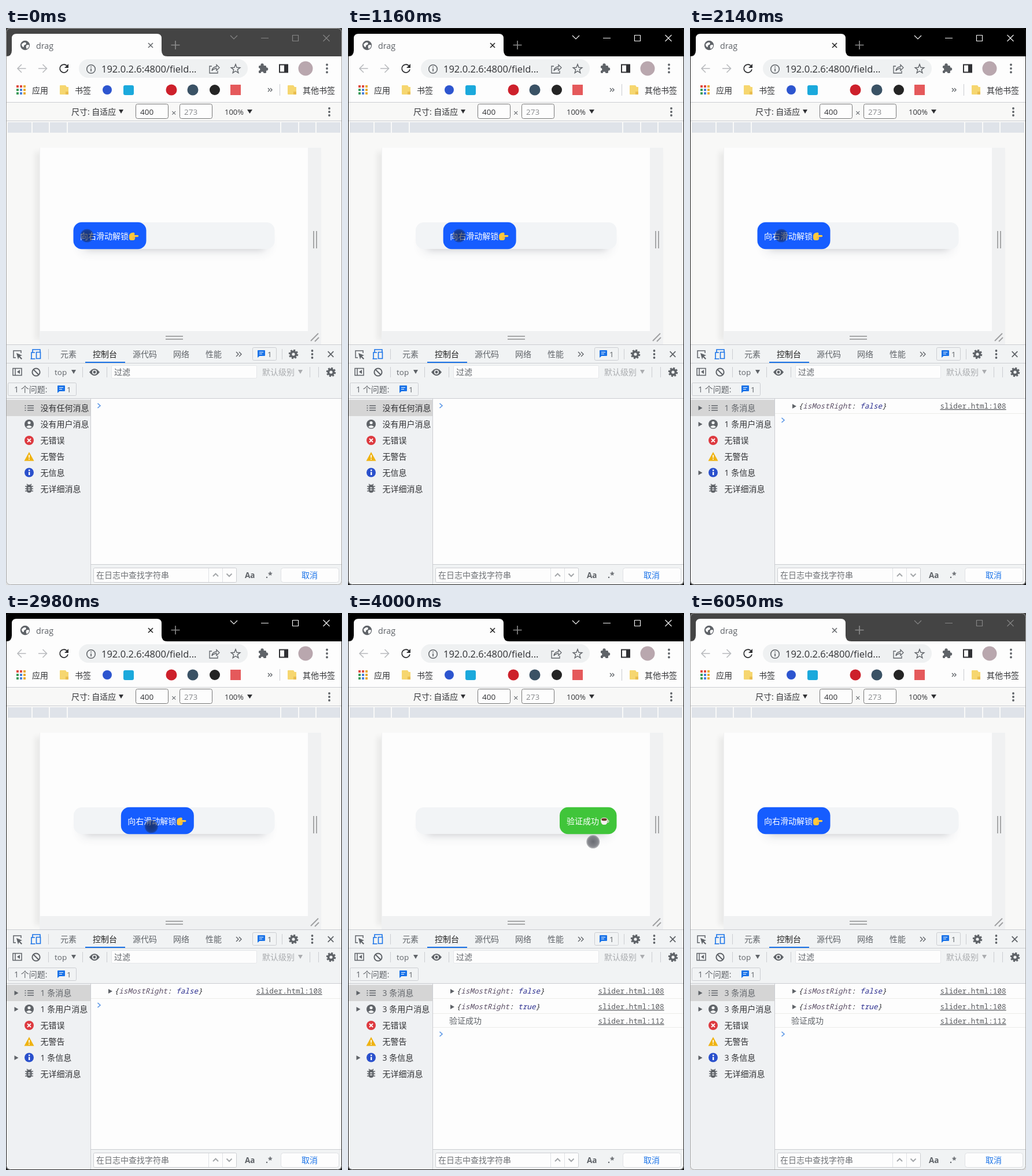
Write an HTML page that moves like this. It is 581 by 963 pixels and loops after 6130 ms.

```html
<!DOCTYPE html>
<html lang="zh-CN">
<head>
<meta charset="utf-8">
<title>Slide to unlock</title>
<style>
html, body { margin: 0; width: 100%; height: 100%; overflow: hidden; background: #fdfdfd; }
svg { display: block; width: 581px; height: 963px; }
text { font-family: "Open Sans", "Noto Sans CJK SC", "Noto Sans CJK JP", "Noto Sans CJK", sans-serif; white-space: pre; }
.mono { font-family: "Noto Sans Mono", "DejaVu Sans Mono", monospace; }
</style>
</head>
<body>
<svg id="stage" viewBox="0 0 581 963" xmlns="http://www.w3.org/2000/svg"></svg>
<script>
const LOOP = 6130;
const INK = '#5f6368', DARK = '#303134', BLUE = '#1a73e8', LINE = '#cbcdd1', PANEL = '#f1f3f4', WHITE = '#fdfdfd';

// Drawing helpers
const rect = (x, y, w, h, fill, extra = '') => `<rect x="${x}" y="${y}" width="${w}" height="${h}" fill="${fill}" ${extra}/>`;
const box = (x, y, w, h, stroke, r = 2, fill = WHITE) => rect(x + .5, y + .5, w - 1, h - 1, fill, `stroke="${stroke}" rx="${r}"`);
const disc = (x, y, r, fill, extra = '') => `<circle cx="${x}" cy="${y}" r="${r}" fill="${fill}" ${extra}/>`;
const ring = (x, y, r, stroke, w = 1.6, extra = '') => disc(x, y, r, 'none', `stroke="${stroke}" stroke-width="${w}" ${extra}`);
const line = (d, stroke = INK, w = 1.6, extra = '') => `<path d="${d}" fill="none" stroke="${stroke}" stroke-width="${w}" ${extra}/>`;
const shape = (d, fill = INK, extra = '') => `<path d="${d}" fill="${fill}" ${extra}/>`;
const text = (x, y, s, fill = DARK, size = 14, extra = '') => `<text x="${x}" y="${y}" font-size="${size}" fill="${fill}" ${extra}>${s}</text>`;
const group = (id, body) => `<g id="${id}">${body}</g>`;
const vline = (x, y1, y2, c = LINE) => rect(x, y1, 1, y2 - y1, c);
const hline = (y, x1 = 0, x2 = 581, c = LINE) => rect(x1, y, x2 - x1, 1, c);
const cross = (x, y, r, c, w = 1.6) => line(`M${x - r} ${y - r}l${2 * r} ${2 * r}m0 ${-2 * r}l${-2 * r} ${2 * r}`, c, w);
const down = (x, y, c = DARK, w = 8, h = 7) => shape(`M${x} ${y}h${w}l${-w / 2} ${h}z`, c);
const play = (x, y) => shape(`M${x} ${y - 4}l7 4l-7 4z`);
const dots = (x, y, gap) => [-gap, 0, gap].map(d => disc(x, y + d, 1.9, INK)).join('');
const gear = (x, y) => ring(x, y, 4.5, INK, 3.8) + ring(x, y, 7, INK, 2.6, 'stroke-dasharray="3 2.5"');
const chat = (x, y) => shape(`M${x + 1} ${y}h11q1 0 1 1v8q0 1 -1 1h-8.500l-3.500 3v-12q0 -1 1 -1z`, BLUE) +
  line(`M${x + 3} ${y + 3.5}h7m-7 3h5`, '#fff', 1.2);
const more = (x, y, r = 4) => line(`M${x} ${y - r}l${r} ${r}l${-r} ${r}m${r + 1} ${-2 * r}l${r} ${r}l${-r} ${r}`, INK, 1.4);
const folder = (x, y) => shape(`M${x} ${y + 1}q0 -1 1 -1h9l2 3h3v12q0 1 -1 1h-13q-1 0 -1 -1z`, '#f6d66f') +
  shape(`M${x + 10} ${y + 11}h5v5h-5z`, '#e9bd50');

function tabStrip() {
  return rect(0, 0, 581, 60, '#444', 'id="title"') +
    shape('M0 49Q10 49 10 39V18Q10 10 18 10H261Q269 10 269 18V39Q269 49 279 49V50H0z', WHITE) +
    disc(33, 30, 8.2, INK) + shape('M27 28q4 -4 7 -3q2 3 -1 4q-3 1 -2 4q-4 0 -4 -5zM35 30q4 -2 5 0q0 4 -4 6q-2 -2 -1 -6z', WHITE) +
    text(52, 35.5, 'drag', INK, 14.3) +
    group('tabClose', cross(250, 30, 4, 'currentColor')) +
    line('M293 22v15m-7.500 -7.500h15', '#8d8d8d') +
    group('controls', line('M388 13l6 6l6 -6M441 17.500h13', 'currentColor', 1.2) +
      line('M495.500 12.500h10v10h-10z', 'currentColor', 1.2, 'stroke-linejoin="round"') + cross(554, 17.5, 5.5, 'currentColor', 1.2));
}

function toolbar() {
  const puzzle = rect(437, 65, 13, 13, INK, 'rx="1.500"') + disc(443, 64, 2.7, INK) + disc(450.5, 71, 2.7, INK) +
    disc(437, 71.5, 2.4, WHITE) + disc(443, 78, 2.4, WHITE);
  const star = Array.from({ length: 10 }, (_, i) => {
    const r = i % 2 ? 3.5 : 8.2, a = i * Math.PI / 5;
    return (397 + r * Math.sin(a)).toFixed(1) + ' ' + (71 - r * Math.cos(a)).toFixed(1);
  }).join('L');
  return rect(0, 49, 581, 79, WHITE) +
    line('M34.500 70H20m7 -7l-7 7l7 7M56 70h14.500m-7 -7l7 7l-7 7', '#b9bbbe') +
    line('M105.500 65.500a7 7 0 1 0 1.500 6', DARK, 1.8) + shape('M108 62v7h-7z', DARK) +
    rect(126, 54, 292, 32, '#eff1f2', 'rx="16"') +
    ring(147, 71, 7.3, INK, 1.5) + rect(146.2, 70, 1.7, 5, INK) + rect(146.2, 66.5, 1.7, 1.8, INK) +
    text(165, 77, '192.0.2.6:4800/field...', DARK, 16.5) +
    line('M356 66h-4v12h14v-4M356 74q1 -7 8 -7v-3.500l5 5l-5 5v-3.500q-5 0 -8 4z', INK, 1.3) +
    line('M' + star + 'z', INK, 1.4) + puzzle +
    line('M473 63.500h14v13h-14z', DARK, 2) + rect(481, 63, 6, 14, DARK) +
    disc(518, 70, 12.5, '#b9a7ae') + dots(555, 70, 6.5);
}

function bookmarks() {
  const colors = ['#df4b3f', '#df4b3f', '#e8aa32', '#3b9b5a', '#4a82dd', '#e8aa32', '#3b9b5a', '#4a82dd', '#e8aa32'];
  const apps = colors.map((c, i) => rect(18 + i % 3 * 6, 99 + Math.floor(i / 3) * 6, 4, 4, c)).join('');
  return apps + text(45, 113, '应用') + folder(93, 99) + text(119, 113, '书签') +
    disc(175, 107, 8, '#2d55cf') + rect(203, 99, 18, 17, '#1ba9dc', 'rx="3"') +
    disc(286, 107, 9.5, '#cd202b') + disc(323, 107, 9.5, '#3a5265') + disc(361, 107, 9, '#242424') +
    rect(388, 98, 18, 18, '#e5595b') +
    more(453, 107, 3) + vline(473, 97, 117) + folder(487, 99) + text(513, 113, '其他书签') + hline(128);
}

function deviceArea() {
  const ticks = [45, 75, 106, 475, 506, 536].map(x => rect(x - 1, 163, 2, 18, '#f9f9f8')).join('');
  return rect(0, 129, 581, 419, '#f8f8f7') +
    text(113, 150, '尺寸: 自适应') + down(195, 141) +
    box(224, 131, 57, 26, '#777', 3) + text(232, 150, '400', DARK, 13.5) +
    text(286, 152, '×', INK, 15) +
    box(300, 131, 57, 26, '#777', 3) + text(308, 150, '273', '#85878a', 13.5) +
    text(378, 150, '100%', DARK, 13) + down(417, 141, DARK, 9) + dots(559, 145, 6) +
    hline(160) + rect(3, 163, 575, 18, '#dfe3e9') + ticks +
    rect(50, 214, 490, 326, '#000', 'opacity=".055" filter="url(#mid)"') +
    rect(58, 207, 487, 340, '#f0f1f2') + rect(59, 207, 463, 317, WHITE) +
    rect(531, 351, 2, 30, '#a6a7a8') + rect(536, 351, 2, 30, '#a6a7a8') +
    rect(276, 532, 30, 2, '#a6a7a8') + rect(276, 537, 30, 2, '#a6a7a8') +
    line('M527 541l13 -13M534 542l7 -7', '#a0a1a2', 2);
}

function slider() {
  const hand = shape('M213 358.500q1 -4 5 -4.500q4 -1.500 4.500 1.500l-.5 2.500h5.500q1.700 0 1.700 1.600t-1.700 1.600h-4.500q1 5.300 -3 5.800h-3.500q-3.500 0 -3.500 -4z', '#ffc83d') +
    line('M219 361.500h4m-4 2h4', '#e8a93a', .7);
  const cup = shape('M437 357h12q0 8 -4 9h-4q-4 -1 -4 -9z', '#f3f0ee') + ring(449, 360, 1.9, '#e4dedb', 1.2) +
    `<ellipse cx="443" cy="357" rx="6" ry="3.200" fill="#f7f4f2"/><ellipse cx="443" cy="357" rx="4.800" ry="2.300" fill="#6b3a2a"/>`;
  return rect(126, 352, 330, 38, '#3c4660', 'rx="14" opacity=".09" filter="url(#soft)"') +
    rect(138, 360, 308, 24, '#333', 'rx="8" opacity=".12" filter="url(#mid)"') +
    rect(117, 336, 347.5, 46, '#f2f4f6', 'rx="14"') +
    group('knob', rect(116.5, 335.7, 126, 46.5, '#165dff', 'rx="14.500"') + text(128, 365, '向右滑动解锁', '#fff') + hand) +
    group('done', rect(366, 335.7, 98.5, 46.5, '#40c53a', 'rx="14.500"') + text(378, 365, '验证成功', '#fff') + cup) +
    group('touch', disc(0, 0, 11.5, 'url(#touchFill)'));
}

function devTools() {
  const tabs = [[94, '元素'], [150, '控制台'], [219, '源代码'], [289, '网络'], [345, '性能']];
  return rect(0, 547, 581, 416, PANEL) + hline(547) +
    line('M26 562v-4h-13v12h4', INK, 1.5) + shape('M18 562l10 4l-4 1.500l4 4l-1.500 1.500l-4 -4l-1.500 4z') +
    line('M46 561v-5h13v4M42.500 572h8M44 572v-11h6', BLUE, 1.6) + line('M52.500 560.500h7v11h-7z', BLUE, 1.6) + vline(73, 555, 573) +
    tabs.map(([x, s]) => text(x, 569, s, x === 150 ? '#222' : INK)).join('') + rect(137, 577, 69, 2, BLUE) +
    more(398, 564) + box(426, 552, 42, 23, LINE, 2, PANEL) + chat(435, 557) + text(452, 569, '1', INK, 13.5) +
    vline(477, 555, 573) + gear(497, 564) + dots(529.5, 564, 6) + cross(561.5, 564, 4.8, INK, 1.8) + hline(579) +
    line('M12 588.500h15v12h-15zM16 588v13', INK, 1.5) + shape('M24 591v7l-5 -3.500z') +
    ring(52, 595, 6.6, INK, 2) + line('M47.500 590.500l9 9', INK, 2) + vline(73, 586, 604) +
    text(84, 600, 'top', INK, 13.5) + down(113, 591, INK) + vline(132, 586, 604) +
    shape('M144 595q9 -12 18 0q-9 12 -18 0z') + disc(153, 595, 4, PANEL) + disc(153, 595, 2.4, INK) + vline(174, 586, 604) +
    box(182, 583, 252, 23, '#e4e6e9') + text(187, 600, '过滤', INK) +
    text(443, 600, '默认级别', '#aaacaf') + down(505, 591, '#aaacaf') + vline(525, 586, 604) + vline(540, 586, 604) + gear(562, 595) +
    box(3, 613, 119, 23, LINE, 2, PANEL) + text(14, 630, '1 个问题:', INK) + chat(89, 618) + text(105, 630, '1', INK, 13.5) + hline(640);
}

const rowY = i => 657 + i * 28;
function sidebar() {
  const labels = ['没有任何消息', '没有用户消息', '无错误', '无警告', '无信息', '无详细消息'];
  const icons = [
    line('M37 653h11m-11 4h11m-11 4h11M32.500 653h2m-2 4h2m-2 4h2', INK, 1.7),
    disc(40, 685, 8, INK) + disc(40, 682.5, 2.6, PANEL) + shape('M35 689.500q5 -5 10 0q-5 4.500 -10 0z', PANEL),
    disc(40, 713, 8, '#dd3a40') + cross(40, 713, 3, '#fff', 1.8),
    shape('M40 733l8.500 15.500h-17z', '#efb312') + rect(39.2, 738, 1.7, 5, '#fff') + rect(39.2, 744.5, 1.7, 1.8, '#fff'),
    disc(40, 768.5, 8, '#2a50cc') + rect(39, 767.5, 2.4, 5.5, '#fff') + rect(39, 763.5, 2.4, 2.4, '#fff'),
    rect(35.5, 789.5, 9, 14, INK, 'rx="4.500"') + line('M33 792.500h14m-14 4h14m-14 4h14M36 788.500l3 3m5 -3l-3 3', INK, 1.6) + line('M38 795h4m-4 3.500h4', PANEL, 1.3)
  ];
  return rect(0, 641, 146, 322, '#eff1f3') + rect(0, 643, 146, 28, '#d5d5d5') + vline(146, 641, 963) +
    icons.join('') + labels.map((s, i) => text(59.5, rowY(i) + 5, s, DARK, 14, `id="row${i}"`)).join('') +
    group('arrows', [0, 1, 4].map(i => play(14.5, rowY(i))).join(''));
}

function consolePane() {
  const link = (y, n) => text(432.5, y + 5, 'slider.html:' + n, '#5a5c60', 12.7, 'class="mono" text-decoration="underline"');
  const obj = (y, v) => play(177, y + 1) + text(187.5, y + 5, `{<tspan fill="#5d5067">isMostRight</tspan>: <tspan fill="#2a2d8f">${v}</tspan>}`, DARK, 12.7, 'class="mono" font-style="italic"') + link(y, 108);
  const sep = y => hline(y, 147, 581, '#ebebe9');
  return rect(147, 641, 434, 287, WHITE) +
    group('log1', obj(653, 'false') + sep(666)) +
    group('log3', obj(680, 'true') + sep(692) + text(175, 710, '验证成功', INK) + link(705, 112) + sep(716)) +
    group('prompt', line('M158.500 -4l4.500 4l-4.500 4', '#5a96e6', 1.6)) +
    rect(147, 928, 434, 35, PANEL) + hline(927, 147) +
    box(151, 933, 248, 26, LINE) + text(156, 951, '在日志中查找字符串', '#6e7175') + vline(350, 934, 958, '#dfe1e4') + vline(374, 934, 958, '#dfe1e4') +
    line('M358 948l4.500 -4.500l4.500 4.500M381.500 943.500l4.500 4.500l4.500 -4.500', '#a5a8ab', 2) +
    text(413, 951, 'Aa', INK, 13.5, 'font-weight="700"') + text(449, 951, '.*', INK, 14, 'font-weight="700"') +
    box(475, 933, 101, 26, '#dfe1e4', 4) + text(511, 951, '取消', BLUE);
}

const blur = (id, d) => `<filter id="${id}" x="-20%" y="-80%" width="140%" height="260%"><feGaussianBlur stdDeviation="${d}"/></filter>`;
const stage = document.getElementById('stage');
stage.innerHTML = '<defs>' + blur('soft', 8) + blur('mid', 5) +
  `<radialGradient id="touchFill" stop-color="#1a1d28">
    <stop offset="0" stop-color="#1a1d28" stop-opacity=".64"/>
    <stop offset=".75" stop-color="#1a1d28" stop-opacity=".52"/>
    <stop offset="1" stop-color="#1a1d28" stop-opacity=".3"/>
  </radialGradient></defs>` +
  rect(0, 0, 581, 963, WHITE) + tabStrip() + toolbar() + bookmarks() + deviceArea() + slider() + devTools() + sidebar() + consolePane() +
  shape('M0 955v8h8q-8 0 -8 -8zM581 955v8h-8q8 0 8 -8z', '#ddd', 'id="corners"') +
  rect(.5, .5, 580, 962, 'none', 'id="frame" rx="7"');

const el = id => document.getElementById(id);
const show = (id, on) => el(id).setAttribute('display', on ? 'inline' : 'none');
const move = (id, x, y) => el(id).setAttribute('transform', `translate(${x.toFixed(2)} ${y.toFixed(2)})`);

// Value at time t from [time, value, ...] keys
function track(keys, t, i = 1) {
  const n = keys.findIndex(k => k[0] > t);
  if (n < 0) return keys[keys.length - 1][i];
  if (n === 0) return keys[0][i];
  const a = keys[n - 1], b = keys[n];
  return a[i] + (b[i] - a[i]) * (t - a[0]) / (b[0] - a[0]);
}
const easeOut = p => 1 - (1 - p) ** 3;

const FOCUS = 420, BLUR = 4400, RELEASE = 1750, SUCCESS = 3700, RESET = 5770;
const POINTER = [[280, 140, 359], [860, 143, 359], [1160, 192, 359], [1600, 263, 361], [1790, 264, 361], [2140, 158, 359],
  [2190, 157, 359], [2370, 139, 365], [2510, 158, 368], [2700, 160, 368], [2740, 167, 368], [2980, 251, 369],
  [3400, 388, 381], [3560, 410, 384], [3950, 414, 386], [4400, 500, 470]];
const DRAG = [[860, 0], [1160, 48], [1600, 119], [RELEASE, 120]];
const PULL = [[2715, 0], [2980, 82], [3390, 222]];

function knobOffset(t) {
  if (t < RELEASE) return track(DRAG, t);
  if (t < 2400) return 120 * (1 - easeOut(Math.min(1, (t - RELEASE) / 300)));
  if (t < RESET) return track(PULL, t);
  return 222 * (1 - easeOut(Math.min(1, (t - RESET) / 270)));
}

function render(t) {
  const active = t >= FOCUS && t < BLUR;
  const count = t < RELEASE ? 0 : t < SUCCESS ? 1 : 3;
  const success = t >= SUCCESS && t < RESET;

  el('title').setAttribute('fill', active ? '#000' : '#444');
  el('controls').style.color = active ? '#f2f2f2' : '#858585';
  el('tabClose').style.color = active ? '#222' : '#66696d';
  el('frame').setAttribute('stroke', active ? '#1c1c1c' : '#a5a5a5');
  el('corners').setAttribute('fill', active ? '#111' : '#ddd');

  show('knob', !success);
  show('done', success);
  move('knob', knobOffset(t), 0);
  show('touch', t < BLUR);
  move('touch', track(POINTER, t, 1), track(POINTER, t, 2));

  show('log1', count > 0);
  show('log3', count > 1);
  show('arrows', count > 0);
  move('prompt', 0, [653, 678, 0, 728][count]);
  el('row0').textContent = count ? count + ' 条消息' : '没有任何消息';
  el('row1').textContent = count ? count + ' 条用户消息' : '没有用户消息';
  el('row4').textContent = count ? count + ' 条信息' : '无信息';
  el('row0').setAttribute('fill', count ? INK : DARK);
}

const start = performance.now();
function tick() {
  render((performance.now() - start) % LOOP);
  requestAnimationFrame(tick);
}
tick();
</script>
</body>
</html>
```
